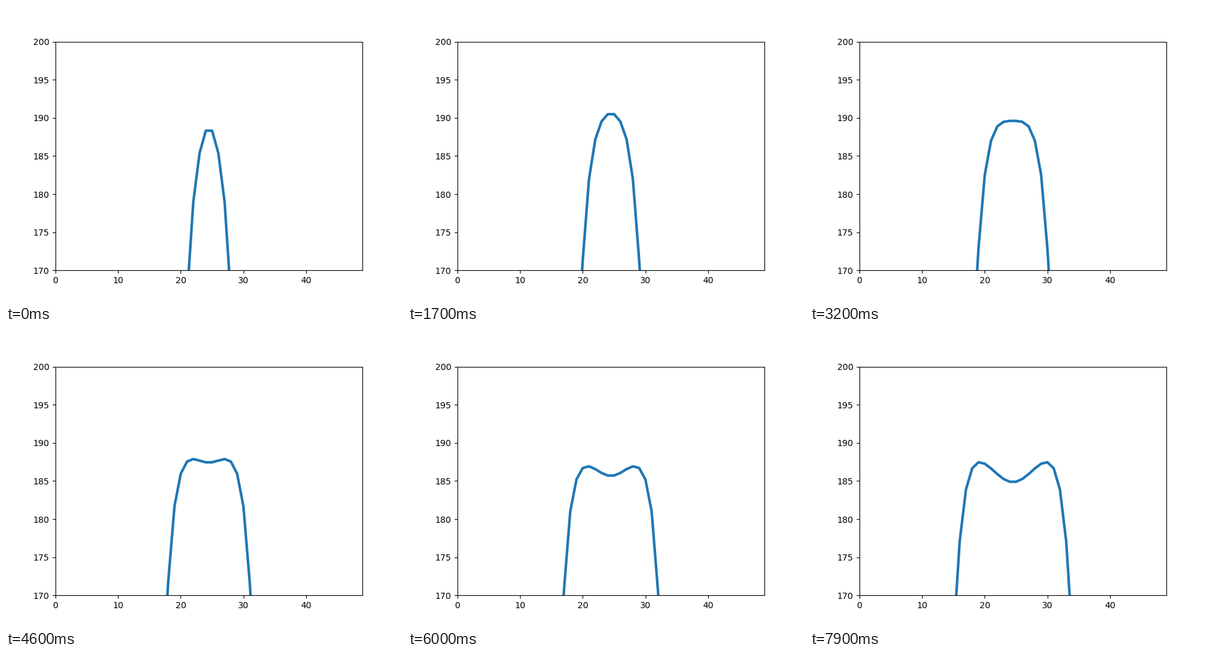
Write a matplotlib script that moves like this. It is 640x480 px and loops after 8 s.

```python
import numpy as np
import matplotlib.pyplot as plt
from matplotlib.animation import FuncAnimation

FRAMES = 80
PERIOD = 14.25      # frames per pulsation
PEAK = 64           # a moment of greatest swell
LEVEL, FLOOR = 189, 170

x = np.arange(50)
dist = np.abs(x - 24.5)


def flank(s):
    """Drop from the crest at a distance s behind the front."""
    drop = LEVEL - FLOOR
    return np.where(s > 0, drop * np.exp(-0.85 * np.maximum(s, 0)),
                    drop - 13 * s)


def profile(t):
    beat = np.cos(2 * np.pi * (t - PEAK) / PERIOD)

    # The front moves outwards steadily, with a surge on every beat.
    half_width = 3.51 + 0.068 * t + (0.28 - 0.001 * t) * beat
    s = half_width - dist

    # The crest swells with the beat and settles over time.
    swell = 0.1 + 3.3 * np.exp(-(t / 33) ** 2) + (2 - 0.014 * t) * beat
    crest = swell * (1 - np.exp(-(np.maximum(s, 0) / 2) ** 2))

    # A hollow deepens and widens in the middle.
    depth = 0.095 * max(t - 25.4, 0)
    hollow = depth * np.exp(-(dist / (0.3 + 0.06 * t)) ** 2)

    return LEVEL + crest - hollow - flank(s)


fig, ax = plt.subplots(figsize=(6.4, 4.8), dpi=100)
ax.set_xlim(0, 49)
ax.set_ylim(FLOOR, 200)
line, = ax.plot(x, profile(0), color="#1f77b4", lw=3)


def update(i):
    line.set_ydata(profile(i))
    return line,


anim = FuncAnimation(fig, update, frames=FRAMES, interval=100,
                     repeat=True, repeat_delay=0)
plt.show()
```
